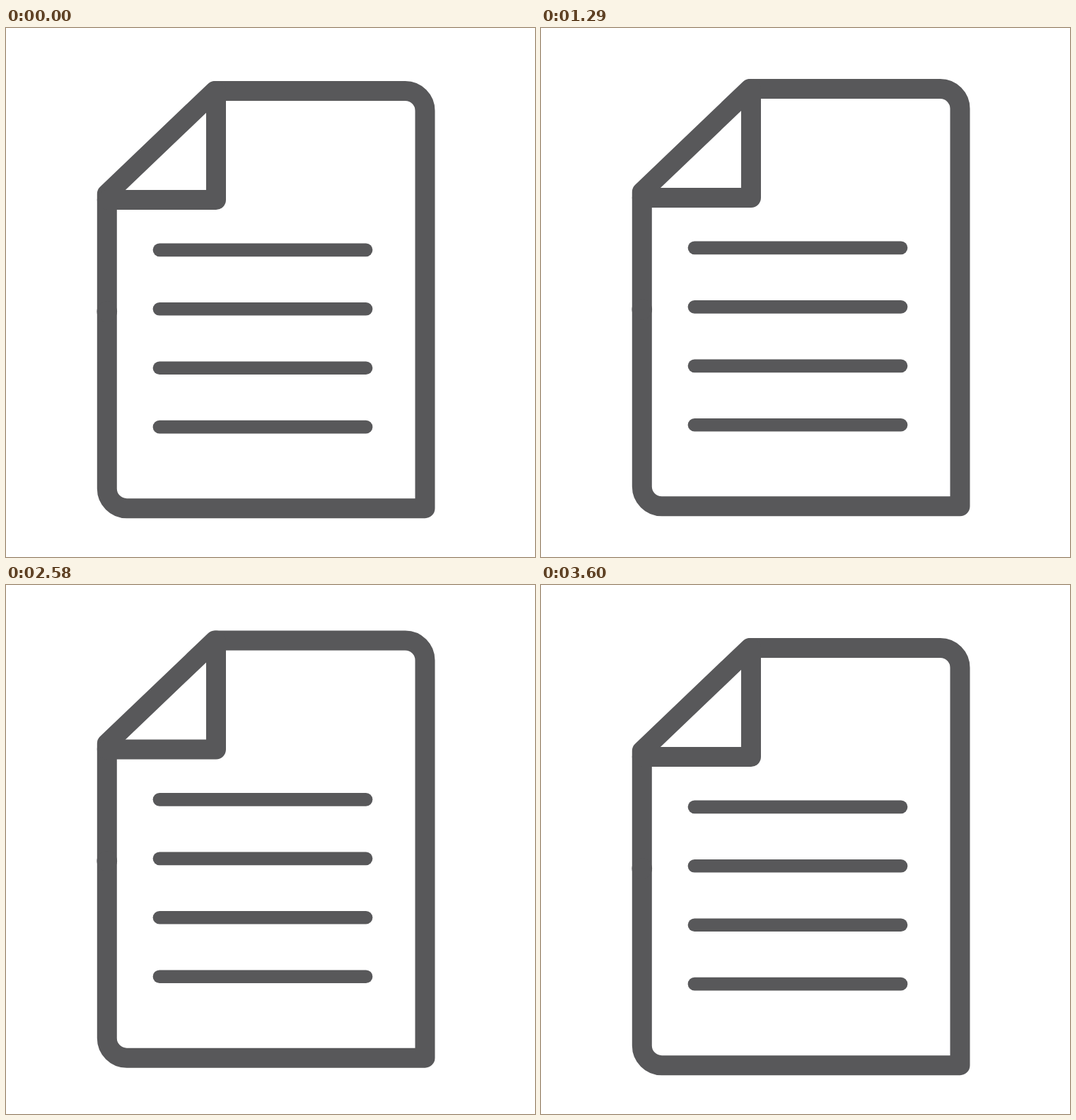
An HTML page for the animation above (3.63 s loop, 748 by 748 pixels).

```html
<!DOCTYPE html>
<html lang="en">
<head>
<meta charset="utf-8">
<title>Document</title>
<style>
  html, body { margin: 0; width: 100%; height: 100%; overflow: hidden; background: #fff; }
  svg { display: block; width: 100vw; height: 100vh; }
</style>
</head>
<body>
<svg viewBox="0 0 748 748">
  <g id="page" fill="none" stroke="#58585a" stroke-width="28" stroke-linecap="round" stroke-linejoin="round">
    <path d="M142.8 234.7 L295.2 89 H564.5 A28 28 0 0 1 592.5 117 V679.2 H170.8 A28 28 0 0 1 142.8 651.2 Z"/>
    <path d="M297 89 V243 H142.8"/>
    <circle cx="142.8" cy="400.8" r="14.3" fill="#58585a" stroke="none"/>
    <g id="rows" stroke-width="18.7"></g>
  </g>
</svg>
<script>
const STEP = 30, FRAMES = 121;
const HALF = 20, LIFT = 48.5;
const ROW = { x: 217, y: 313.8, gap: 83.47, width: 292, start: 2, stagger: 4, span: 10 };

const page = document.getElementById('page');
const box = document.getElementById('rows');
const rows = [0, 1, 2, 3].map(() =>
  box.appendChild(document.createElementNS('http://www.w3.org/2000/svg', 'path')));

const clamp = v => Math.min(1, Math.max(0, v));
const ease = v => v * v * (3 - 2 * v);

// Share of a row that is written; the loop opens on the finished page.
function written(i, frame) {
  if (frame === 0) return 1;
  return ease(clamp((frame - ROW.start - i * ROW.stagger) / ROW.span));
}

function render(ms) {
  const frame = Math.floor(ms / STEP) % FRAMES;
  const phase = frame % (2 * HALF) / HALF;
  const lift = LIFT * ease(phase < 1 ? phase : 2 - phase);
  page.setAttribute('transform', `translate(0 ${-lift.toFixed(2)})`);
  rows.forEach((row, i) => {
    const part = written(i, frame);
    const d = `M${ROW.x} ${ROW.y + i * ROW.gap} h${ROW.width * part}`;
    row.setAttribute('d', part > 0 ? d : '');
  });
}

let origin;
function tick(now) {
  origin ??= now;
  render(Math.max(0, now - origin));
  requestAnimationFrame(tick);
}
render(0);
requestAnimationFrame(tick);
</script>
</body>
</html>
```
